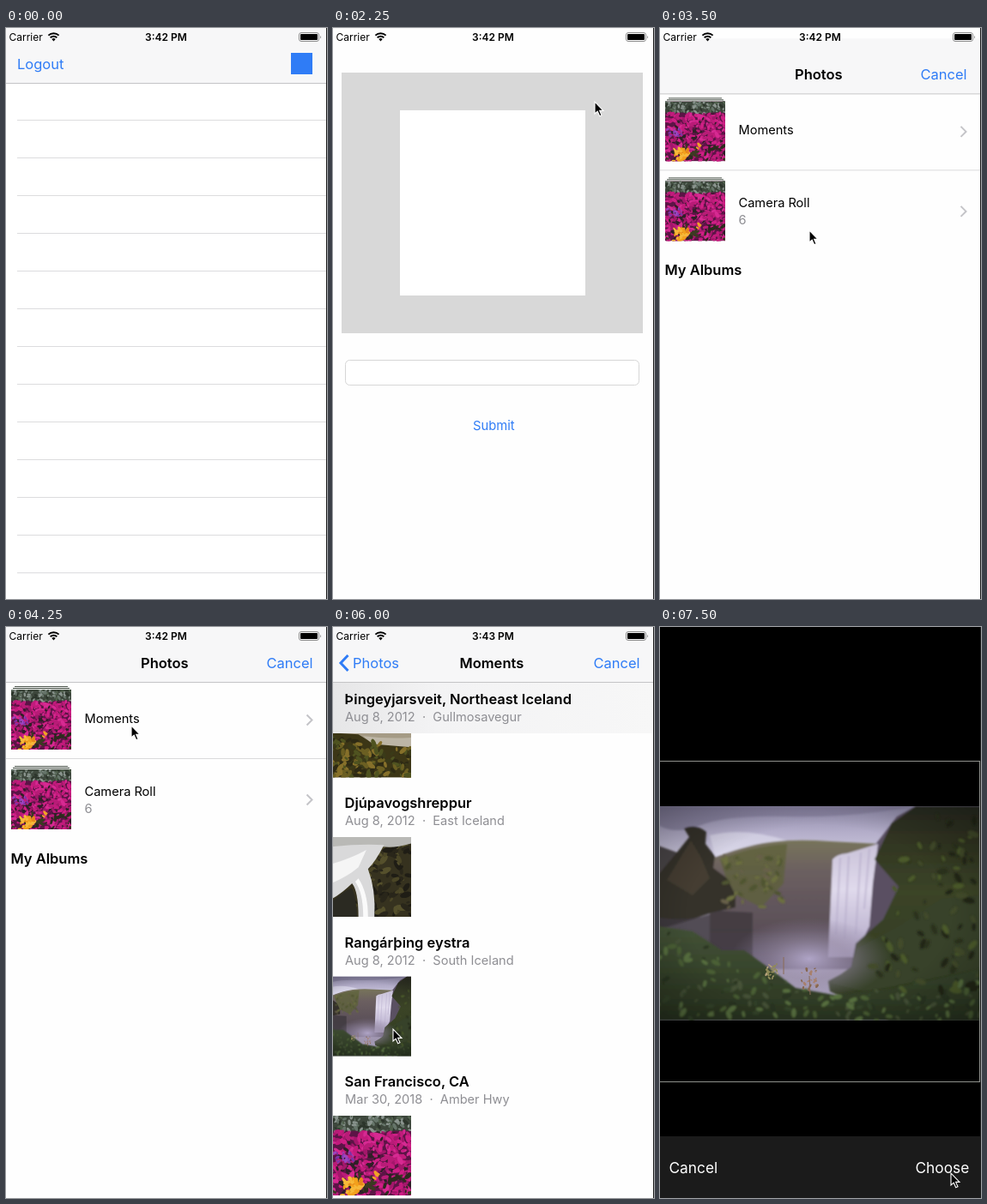
Recreate the animation shown at these times as an HTML page. Size 374 by 666 pixels, loop 8000 ms.

```html
<!DOCTYPE html>
<html lang="en">
<head>
<meta charset="utf-8">
<title>Photo picker</title>
<style>
  html, body { margin: 0; width: 100%; height: 100%; overflow: hidden; background: #fff; }
  svg { display: block; }
  #stage { width: 100vw; height: 100vh; }
  text { font-family: Inter, Roboto, sans-serif; white-space: pre; }
</style>
</head>
<body>
<script>
const LOOP = 8000, STEP = 250, W = 375, H = 666;
const BLUE = '#2f7cf6', GREY = '#8e8e93';

// ---- drawing helpers ----
const text = (x, y, size, str, fill = '#000', more = '') =>
  `<text x="${x}" y="${y}" font-size="${size}" fill="${fill}" ${more}>${str}</text>`;
const bold = (x, y, size, str, more = '') => text(x, y, size, str, '#000', 'font-weight="600" ' + more);
const rect = (x, y, w, h, fill, more = '') =>
  `<rect x="${x}" y="${y}" width="${w}" height="${h}" fill="${fill}" ${more}/>`;
const path = (d, fill, more = '') => `<path d="${d}" fill="${fill}" ${more}/>`;
const photo = (id, x, y, w, h, box) =>
  `<svg x="${x}" y="${y}" width="${w}" height="${h}" viewBox="${box}" preserveAspectRatio="xMidYMid slice"><use href="#${id}"/></svg>`;
const grad = (id, stops, dir = 'x2="0" y2="1"') =>
  `<linearGradient id="${id}" ${dir}>` +
  stops.map(([o, c]) => `<stop offset="${o}" stop-color="${c}"/>`).join('') + '</linearGradient>';

function random(seed) {
  return () => (seed = (seed * 16807) % 2147483647) / 2147483647;
}

// Scattered leaves or petals inside a box, kept where test(x, y) holds
function dabs(n, [x0, y0, w, h], size, colors, seed, test = () => true) {
  const rnd = random(seed);
  let out = '';
  for (let i = 0; i < n; i++) {
    const x = x0 + rnd() * w, y = y0 + rnd() * h, r = size * (0.5 + rnd());
    const c = colors[Math.floor(rnd() * colors.length)], a = rnd() * 180;
    if (test(x, y)) {
      out += `<ellipse rx="${r.toFixed(1)}" ry="${(r * 0.5).toFixed(1)}" fill="${c}" ` +
        `transform="translate(${x.toFixed(1)} ${y.toFixed(1)}) rotate(${a.toFixed(0)})"/>`;
    }
  }
  return out;
}

// ---- photographs ----
const falls = `<g id="falls">
  ${rect(0, 0, 375, 250, 'url(#sky)')}
  <g filter="url(#soft)">
  ${path('M0 0H300Q220 14 150 12T50 22T0 22Z', '#77728e', 'opacity=".55"')}
  ${path('M60 34Q100 24 150 40L110 46Q90 56 66 58Z', '#e2e0ef', 'opacity=".6"')}
  ${path('M0 46L22 54V90H0Z', '#4a4446')}
  ${path('M60 62Q100 46 130 42T200 41L258 44V190H60Z', 'url(#cliff)')}
  ${path('M72 62Q110 46 150 44L146 90L120 118L84 100Z', '#5d6238', 'opacity=".7"')}
  ${path('M252 46L278 12L300 0V110L240 150Z', '#5a5062')}
  ${path('M203 62Q208 56 220 55L256 44L250 90L246 140L228 176H198Z', 'url(#water)')}
  <path d="M212 60L207 150M222 58L217 155M236 54L230 150M246 50L240 120" fill="none" stroke="#b3a8c9" stroke-width="2" opacity=".6"/>
  ${path('M252 62L272 20L300 0H375V250H270L200 216L198 204L224 190L230 160L262 132L280 94Z', 'url(#hill)')}
  ${path('M375 104L330 108L280 140L232 166L226 186L200 206L240 216L375 190Z', '#37422a')}
  ${path('M0 80L20 56L36 36L30 26Q44 20 56 30L55 44L66 58L64 72L80 84L90 104V118Q60 124 40 132L0 144Z', '#34302a')}
  ${path('M10 86L38 40L50 60L60 84L40 104Z', '#443e32')}
  ${path('M0 130Q40 136 70 122L110 124V180H0Z', '#403a40', 'opacity=".85"')}
  </g>
  <ellipse cx="176" cy="178" rx="92" ry="48" fill="url(#mist)"/>
  <g filter="url(#soft)">
  ${path('M0 140L40 146L74 168L100 168L128 188L160 212L204 220L270 214L375 190V250H0Z', 'url(#grass)')}
  ${dabs(330, [0, 140, 375, 110], 4, ['#4c6136', '#34452a', '#587040', '#2b3621', '#465338'], 71,
    (x, y) => y > (x < 200 ? 142 + x * 0.4 : 222 - (x - 200) * 0.16))}
  ${dabs(150, [200, 0, 175, 215], 5, ['#4b5a2c', '#2c321e', '#434c2b', '#232719'], 19,
    (x, y) => x > 300 - y * 0.28 + Math.max(0, 70 - y) * 0.1 && y > 12)}
  ${dabs(50, [75, 58, 70, 60], 4, ['#6c7040', '#505530', '#67604a'], 8)}
  </g>
  ${dabs(22, [126, 184, 14, 18], 2, ['#b7a27c', '#8f8a58'], 5)}
  ${dabs(24, [167, 188, 18, 26], 2, ['#a8806c', '#86664e'], 12)}
  <path d="M177 220L176 198M146 196V176" stroke="#8a6b55" stroke-width="1"/>
  ${rect(0, 0, 375, 250, 'url(#vignette)')}
</g>`;

const flowers = `<g id="flowers">
  ${rect(0, 0, 100, 100, '#5c1446')}
  ${rect(0, 0, 100, 19, '#3d473c')}
  ${dabs(110, [0, 0, 100, 20], 3, ['#66756a', '#2c352b', '#50604d', '#8a948e'], 3)}
  ${dabs(430, [0, 20, 100, 80], 4, ['#c21b7c', '#d62a92', '#a4176b', '#b81c77', '#2f2027', '#cf1f85'], 44)}
  ${dabs(24, [4, 44, 24, 16], 2.5, ['#9a45c0', '#7c33a6'], 9)}
  ${dabs(30, [0, 74, 100, 26], 4, ['#2d2a1e', '#3b3a22'], 27)}
  ${dabs(38, [14, 80, 24, 20], 4, ['#f2a01c', '#e8861a', '#f7b93a'], 15)}
  ${dabs(5, [54, 72, 8, 8], 3, ['#f0a425'], 6)}
</g>`;

const stream = `<g id="stream">
  ${rect(0, 0, 100, 100, '#36321f')}
  ${dabs(130, [25, 8, 75, 92], 5, ['#4a4526', '#29261a', '#55502c', '#1f1d15'], 33)}
  <g filter="url(#soft)">
  ${path('M0 0H100V8Q80 14 64 12L0 18Z', '#b9b9b6')}
  ${path('M0 12Q40 8 66 10Q56 30 46 40Q56 66 54 100H34Q34 68 26 58Q14 70 0 78Z', '#d9d9da')}
  ${path('M0 34Q26 26 44 16L34 38Q20 50 0 58Z', '#f5f5f5')}
  ${path('M34 52Q46 70 46 100H40Q40 70 30 56Z', '#fafafa')}
  ${path('M0 82Q18 66 26 64Q32 78 32 100H0Z', '#2b2a22')}
  </g>
</g>`;

const moss = `<g id="moss">
  ${rect(0, 0, 100, 100, '#4c431c')}
  ${rect(0, 0, 100, 60, '#a59b85')}
  ${path('M0 44L34 46L50 56L100 62V100H0Z', '#3c3616')}
  ${path('M40 48Q70 52 100 50V62L52 58Z', '#bdb6a6')}
  ${dabs(210, [0, 50, 100, 50], 4, ['#6b5f22', '#2e2a14', '#86702a', '#4f5320', '#3a3a18'], 61,
    (x, y) => y > 50 + x * 0.13)}
</g>`;

const defs = `<defs>
  ${grad('sky', [[0, '#8d88a6'], [0.12, '#b3adc9'], [0.24, '#cfcbe0'], [1, '#a49bb8']])}
  ${grad('cliff', [[0, '#77745a'], [0.25, '#6b5f60'], [0.7, '#5a4f58'], [1, '#6f6680']])}
  ${grad('water', [[0, '#c9c2d8'], [0.4, '#e0daec'], [1, '#aea4c4']])}
  ${grad('hill', [[0, '#2b2c22'], [0.4, '#3b4426'], [1, '#2f3922']])}
  ${grad('grass', [[0, '#435236'], [1, '#2a3521']])}
  ${grad('header', [[0, '#e6e6e7'], [0.32, '#f3f3f4'], [1, '#f7f7f7']], '')}
  <radialGradient id="mist"><stop offset="0" stop-color="#b3a8cb" stop-opacity=".95"/>
    <stop offset=".5" stop-color="#93879f" stop-opacity=".55"/><stop offset="1" stop-color="#857a94" stop-opacity="0"/></radialGradient>
  <radialGradient id="vignette" r=".75"><stop offset=".55" stop-opacity="0"/><stop offset="1" stop-opacity=".35"/></radialGradient>
  <filter id="soft"><feGaussianBlur stdDeviation=".8"/></filter>
  ${falls}${flowers}${stream}${moss}
</defs>`;

// ---- screens ----
const bar = rect(-2, 0, 378, 64, '#f7f7f8') + rect(-2, 64, 378, 1, '#c4c4c6');

const home = () => {
  let rows = '';
  for (let y = 107; y < H; y += 44) rows += rect(13, y, 362, 1, '#dcdcde');
  return rect(0, 0, W, H, '#fff') + rows + bar + text(13, 48, 16.5, 'Logout', BLUE) +
    rect(332, 29, 25, 25, BLUE);
};

const compose = () => rect(0, 0, W, H, '#fefefe') + rect(10, 51, 351, 304, '#d8d8d8') +
  rect(78, 95, 216, 216, '#fff') +
  rect(14.5, 386.5, 342, 29, '#fff', 'rx="5" stroke="#d6d6d6"') +
  text(163, 468.5, 14.8, 'Submit', BLUE);

const arrow = y => `<path d="M350.500 ${y - 6}l6 6l-6 6" fill="none" stroke="#c4c4c8" stroke-width="2"/>`;
const pile = y => rect(10, y - 4, 62, 1, '#4c554c') + rect(8, y - 2, 66, 1, '#3c463c') +
  photo('flowers', 6, y, 70, 70, '0 0 100 100');

const albums = () => rect(-2, 0, 378, H, '#fefefe') +
  rect(-2, 65, 378, 88, '#d9d9d9', 'id="pressed"') + rect(-2, 153, 378, 1, '#dadadc') +
  pile(73) + text(91.5, 112, 14.6, 'Moments') + arrow(108.5) +
  pile(166) + text(91.5, 197, 14.6, 'Camera Roll') + text(91.5, 217, 14.6, '6', GREY) + arrow(201.5) +
  bold(5.5, 276, 16.5, 'My Albums') + rect(-2, 0, 378, H, '#000', 'id="albumDim"');

const places = [
  ['Þingeyjarsveit, Northeast Iceland', 'Aug 8, 2012', 'Gullmosavegur', 'moss', '0 0 100 100'],
  ['Djúpavogshreppur', 'Aug 8, 2012', 'East Iceland', 'stream', '0 0 100 100'],
  ['Rangárþing eystra', 'Aug 8, 2012', 'South Iceland', 'falls', '0 0 375 250'],
  ['San Francisco, CA', 'Mar 30, 2018', 'Amber Hwy', 'flowers', '0 0 100 100']
];
const moments = () => {
  let pics = '', heads = rect(-2, 65, 378, 59, 'url(#header)');
  places.forEach(([name, date, place, id, box], i) => {
    const y = 82.5 + 162.5 * i, base = i ? y - 34 : 90;
    pics += photo(id, -2, y, 93, 93, box);
    heads += bold(13.5, base, 16.5, name) + text(14, base + 20, 14.6, `${date}  ·  ${place}`, GREY);
  });
  return rect(-2, 0, 378, H, '#fefefe') + pics + heads;
};

const nav = () => bar +
  `<path id="back" d="M17.500 33L9 42L17.500 51" fill="none" stroke="${BLUE}" stroke-width="3"/>` +
  bold(157, 48, 16.5, 'Photos', 'id="oldTitle"') +
  text(0, 48, 16.5, 'Photos', BLUE, 'id="backLabel"') +
  bold(0, 48, 16.5, 'Moments', 'id="newTitle"') +
  text(303.5, 48, 16.5, 'Cancel', BLUE, 'id="cancel"');

const status = () => text(3.5, 14.5, 12, 'Carrier') +
  `<g fill="none" stroke="#000" stroke-width="2"><path d="M49.400 8.600a8.800 8.800 0 0 1 12.200 0M51.700 11.200a5.400 5.400 0 0 1 7.600 0"/></g>` +
  path('M55.500 15.500l-2.200-2.400a3.300 3.300 0 0 1 4.400 0z', '#000') +
  bold(162, 14.5, 12, '3:42 PM', 'id="clock"') +
  rect(341.5, 5.5, 23, 10, 'none', 'rx="2.5" stroke="#8c8c8c"') + rect(343, 7, 20, 7, '#000', 'rx="1"') +
  path('M366 8.500q1.800 2 0 4z', '#8c8c8c');

const crop = () => rect(-2, 0, 378, H, '#000') + photo('falls', -2, 209, 375, 250, '0 0 375 250') +
  rect(-1.5, 156.5, 374, 374, 'none', 'stroke="#8f918c"') + rect(-2, 594, 378, 72, '#1b1b1b') +
  text(10.5, 637, 17.3, 'Cancel', '#fff') + text(297.5, 637, 17.3, 'Choose', '#fff');

const cursor = `<path d="M0 0V14L3.200 11.200L5.700 16.800L8 15.800L5.600 10.400H10Z" fill="#000" stroke="#fff" stroke-width="1.100"/>`;

const layer = (id, body) => `<g id="${id}">${body}</g>`;
document.body.innerHTML = `<svg id="stage" viewBox="0 0 374 666">${defs}` +
  layer('home', home()) + layer('compose', compose()) +
  layer('picker', layer('albums', albums()) + layer('moments', moments()) + layer('nav', nav())) +
  rect(0, 0, W, H, '#000', 'id="pickerDim"') +
  layer('status', status()) + layer('crop', crop()) +
  rect(373, 0, 1, H, '#1c1c1c') + layer('cursor', cursor) + '</svg>';

// ---- motion ----
const el = id => document.getElementById(id);
const move = (id, x, y) => el(id).setAttribute('transform', `translate(${x.toFixed(2)} ${y.toFixed(2)})`);
const show = (id, on) => { el(id).style.display = on ? '' : 'none'; };
const fade = (id, a) => el(id).setAttribute('opacity', a.toFixed(3));

// Critically damped spring: share of the way still to go
const rest = (t, start) => {
  const x = Math.max(0, t - start) * 0.016;
  return (1 + x) * Math.exp(-x);
};

// time, x, y of the pointer tip
const track = [
  [500, 248, 1], [750, 272, 28], [1000, 312, 54], [1250, 334, 58], [1500, 336, 44], [2000, 335, 46],
  [2250, 305, 86], [2500, 232, 178], [2750, 190, 232], [3250, 176, 238], [3500, 174, 236],
  [3750, 160, 176], [4000, 147, 118], [4250, 146, 115], [5000, 146, 115], [5250, 132, 200],
  [5500, 98, 350], [5750, 74, 450], [6000, 70, 469], [6250, 76, 469], [6750, 76, 469],
  [7000, 130, 520], [7250, 270, 606], [7500, 339, 637], [8000, 339, 637]
];
function pointer(t) {
  const i = track.findIndex(p => p[0] > t);
  const [t0, x0, y0] = track[i - 1], [t1, x1, y1] = track[i];
  const k = (t - t0) / (t1 - t0);
  return [x0 + (x1 - x0) * k, y0 + (y1 - y0) * k];
}

function draw(t) {
  const rise = rest(t, 1700), lift = rest(t, 3130), push = rest(t, 4492), zoom = rest(t, 6145);
  const done = 1 - push;

  show('home', t < 2500);
  show('compose', t >= 1700 && t < 4000);
  move('compose', 0, H * rise);
  show('picker', t >= 3130 && t < 7000);
  move('picker', -0.3 * W * (1 - zoom), H * lift);

  show('albums', t < 5250);
  move('albums', -0.3 * W * done, 0);
  fade('albumDim', 0.1 * done);
  show('pressed', t >= 4492);
  show('moments', t >= 4492);
  move('moments', W * push, 0);

  fade('back', Math.min(1, done * 1.1));
  fade('oldTitle', Math.max(0, 1 - done * 1.6));
  fade('backLabel', Math.min(1, done * 1.1));
  move('backLabel', 23 + 134 * push, 0);
  fade('newTitle', Math.min(1, done * 1.1));
  move('newTitle', 147.5 + 232 * push, 0);
  fade('cancel', push < 0.02 ? 1 : push);

  fade('pickerDim', 0.08 * (1 - zoom));
  show('pickerDim', t >= 6145);
  show('crop', t >= 6145);
  move('crop', W * zoom, 0);

  el('clock').textContent = t < 5500 ? '3:42 PM' : '3:43 PM';
  show('cursor', t >= 500);
  if (t >= 500) move('cursor', ...pointer(t));
}

let last = -1;
function tick() {
  const t = Math.floor((performance.now() % LOOP) / STEP) * STEP;
  if (t !== last) draw(last = t);
  requestAnimationFrame(tick);
}
tick();
</script>
</body>
</html>
```
